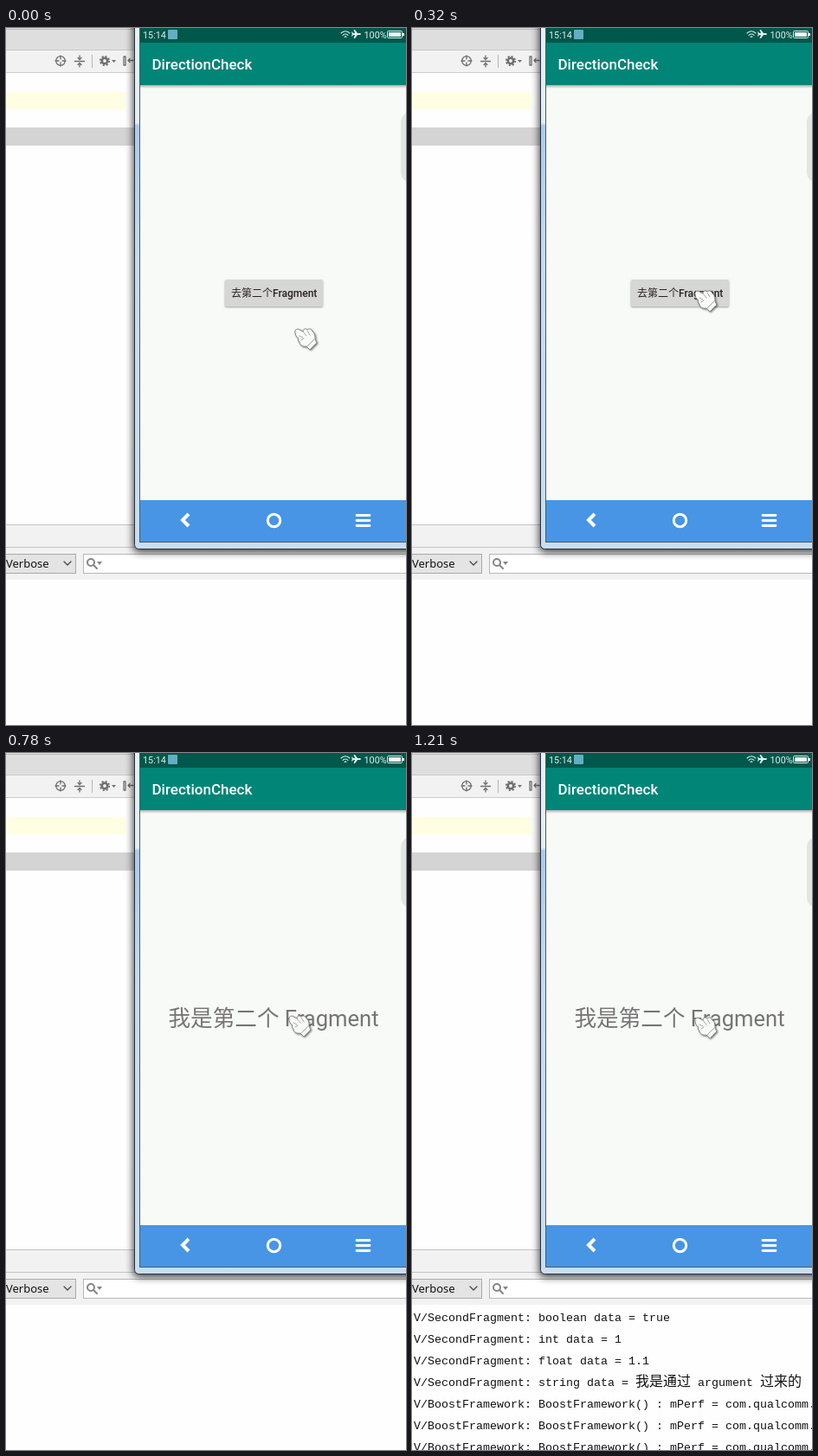
Recreate the animation shown at these times as an HTML page. Size 462x806 px, loop 1.57 s.

```html
<!DOCTYPE html>
<html lang="zh">
<head>
<meta charset="utf-8">
<title>Fragment navigation</title>
<style>
  html, body { margin: 0; width: 100%; height: 100%; overflow: hidden; background: #fefefe; }
  svg { display: block; width: 100%; height: 100%; }
  text { white-space: pre; }
  .ui { font-family: Roboto, "Noto Sans CJK SC", "Noto Sans CJK", sans-serif; }
  .log { font: 13.333px "Liberation Mono", "Noto Sans CJK SC", "Noto Sans CJK", monospace; fill: #111; }
  .log tspan { font-size: 16px; }
  .line { fill: none; stroke-linecap: round; stroke-linejoin: round; }
</style>
</head>
<body>
<svg viewBox="0 0 462 806">
  <defs>
    <linearGradient id="frame" x2="0" y2="1">
      <stop offset="0" stop-color="#e9f1f8"/>
      <stop offset=".195" stop-color="#e2edf7"/>
      <stop offset=".2" stop-color="#a9cbed"/>
      <stop offset=".45" stop-color="#c4dcf3"/>
      <stop offset="1" stop-color="#c9def2"/>
    </linearGradient>
    <linearGradient id="barShadow" x2="0" y2="1">
      <stop stop-color="#000" stop-opacity=".3"/>
      <stop offset="1" stop-color="#000" stop-opacity="0"/>
    </linearGradient>
    <filter id="blur" x="-10%" y="-10%" width="120%" height="120%"><feGaussianBlur stdDeviation="5"/></filter>
  </defs>

  <!-- editor panels -->
  <rect width="462" height="806" fill="#fefefe"/>
  <rect width="462" height="25" fill="#dedede"/>
  <path d="M0 1.5H150" stroke="#b9b9b9"/>
  <rect y="25" width="462" height="26" fill="#f2f2f2"/>
  <path d="M0 25.5H150M0 51.5H150" stroke="#cbcbcb"/>
  <rect y="74" width="138" height="20" fill="#fffee3"/>
  <rect y="115" width="150" height="21" fill="#d4d4d4"/>
  <rect y="574" width="462" height="64" fill="#f2f2f2"/>
  <path d="M0 574.5H462M0 600.5H462" stroke="#c4c4c4"/>

  <!-- editor toolbar icons -->
  <g class="line" stroke="#6e6e6e" stroke-width="1.3">
    <circle cx="63" cy="38" r="5.3"/>
    <path d="M63 32v4M63 40v4M57 38h4M65 38h4M79.500 38.500h11M85 32v4M85 45v-4M83 34.500l2 2 2-2M83 42.500l2-2 2 2"/>
    <circle cx="114" cy="38" r="3.2" stroke-width="2.6"/>
    <circle cx="114" cy="38" r="5.200" stroke-width="1.8" stroke-linecap="butt" stroke-dasharray="2.040 2.040"/>
    <path d="M136 33h2v10h-2zM147 37.500h-6M143 35.500l-2 2 2 2"/>
  </g>
  <path d="M122 37h5l-2.500 3z" fill="#6e6e6e"/>
  <path d="M99.500 31v15" stroke="#b5b5b5"/>

  <!-- log filter controls -->
  <rect x="-2.500" y="608.500" width="83" height="22" fill="#e4e4e4" stroke="#a9a9a9"/>
  <text y="624" font-family="Noto Sans, sans-serif" font-size="13" fill="#111">Verbose</text>
  <path class="line" d="M67 617l4 4 4-4" stroke="#444" stroke-width="1.2"/>
  <rect x="89.500" y="608.500" width="380" height="22" fill="#fff" stroke="#b7b7b7"/>
  <g class="line" stroke="#858585" stroke-width="2">
    <circle cx="98" cy="618" r="4"/>
    <path d="M101 621l4 4"/>
  </g>
  <path d="M105 617h6l-3 4z" fill="#858585"/>

  <g id="log" class="log"></g>

  <!-- phone window -->
  <rect x="147" y="-20" width="340" height="626" rx="6" opacity=".75" filter="url(#blur)"/>
  <rect x="148.500" y="-9.500" width="340" height="612" rx="5" fill="url(#frame)" stroke="#28323c"/>
  <rect x="154.500" y="-5" width="320" height="599.500" fill="#f8faf7" stroke="#4b5a68"/>
  <rect x="155" y="66" width="307" height="4" fill="url(#barShadow)"/>
  <rect x="155" y="17" width="307" height="49" fill="#008577"/>
  <rect x="155" width="307" height="17" fill="#00574b"/>
  <rect x="155" y="546" width="307" height="48" fill="#4795e4"/>

  <!-- status bar -->
  <g class="ui" font-size="10.800" fill="#e3efed">
    <text x="158" y="12">15:14</text>
    <text x="413.500" y="12">100%</text>
  </g>
  <rect x="187" y="2" width="11" height="11" rx="1" fill="#63aec3"/>
  <g class="line" stroke="#dfecea" stroke-width="1.1">
    <path d="M387 6q5-4.500 10 0M389 8.300q3-2.600 6 0M391 10.300q1-1 2 0"/>
  </g>
  <path d="M410 7q0-1-1.500-1H406l-3-4h-1.500l1.500 4h-2l-1-1.500h-1l.8 2.500-.8 2.500h1l1-1.500h2l-1.500 4h1.500l3-4h2.500q1.500 0 1.500-1z" fill="#e3efed"/>
  <rect x="440.500" y="3.500" width="17" height="8" rx="1" fill="none" stroke="#e3efed"/>
  <path d="M442 5h14v5h-14zM458 6h2v3h-2z" fill="#f4f8f7"/>

  <text class="ui" x="168.500" y="48" font-size="17" font-weight="500" fill="#fff">DirectionCheck</text>
  <rect x="456" y="97" width="30" height="82" rx="12" fill="#e3e5e3"/>

  <!-- navigation buttons -->
  <g class="line" stroke="#fff">
    <path d="M211 562l-7 7 7 7" stroke-width="4" stroke-linecap="butt" stroke-linejoin="miter"/>
    <circle cx="309.500" cy="569.500" r="7.200" stroke-width="3"/>
    <path d="M405 563.500h15M405 569.500h15M405 575.500h15" stroke-width="2.800"/>
  </g>

  <g id="firstPage" class="ui">
    <rect id="button" x="253" y="291" width="113" height="31" rx="1.500"/>
    <text x="260" y="310.700" font-size="12" font-weight="500" fill="#2a2222">去第二个Fragment</text>
  </g>
  <text id="secondPage" class="ui" x="187.500" y="315.500" font-size="25.600" fill="#757575">我是第二个 Fragment</text>

  <g id="hand">
    <g transform="translate(333 347)">
      <path id="glove" d="M1 5C0 2 4 0 6 2L10 4C10 1 13 0 15 2C17 0 20 1 21 4C24 6 24 10 24 13L26 17L18 25L14 21C9 22 6 19 6 16C4 15 4 13 5 12C2 10 1 7 1 5Z"
        fill="#fafafa" stroke="#858585" style="filter:drop-shadow(1px 1.500px 1px #0008)"/>
      <path class="line" d="M6 9l4 2M10 4l4 5M15 3l3 5M8 14l3-2M15 21l8-8" stroke="#a5a5a5"/>
    </g>
  </g>
</svg>
<script>
  const LOOP = 1570, STEP = 30;
  const PRESS = 530, RAISED = 710, PAGE_CHANGE = 780, LOG_SHOWN = 840;
  const $ = id => document.getElementById(id);

  // [start time, x, y]: each pose holds until the next
  const handPoses = [
    [0, 0, 0], [150, -1, -5], [180, -3, -16], [210, -5, -27], [240, -6, -36],
    [270, -7, -41], [320, -7, -44], [1150, -7, -43], [1180, -7, -42.500], [1210, -7, -42]
  ];

  const boost = "V/BoostFramework: BoostFramework() : mPerf = com.qualcomm.qti";
  const lines = [
    "V/SecondFragment: boolean data = true",
    "V/SecondFragment: int data = 1",
    "V/SecondFragment: float data = 1.1",
    "V/SecondFragment: string data = <tspan>我是通过</tspan> argument <tspan>过来的</tspan>",
    boost, boost, boost
  ];
  $("log").innerHTML = lines.map((line, i) => `<text x="2" y="${657 + 25 * i}">${line}</text>`).join("");

  const show = (id, visible) => $(id).style.display = visible ? "" : "none";

  function draw(now) {
    const t = now % LOOP;
    const [, x, y] = handPoses.findLast(([start]) => start <= t);
    $("hand").setAttribute("transform", `translate(${x} ${y})`);

    const stepped = Math.floor((t - PRESS) / STEP) * STEP;
    const lift = Math.min(1, Math.max(0, stepped / (RAISED - STEP - PRESS)));
    const shade = 214 - 4 * lift;
    $("button").style.fill = `rgb(${shade},${shade},${shade - 1})`;
    $("button").style.filter =
      `drop-shadow(0 ${1 + lift}px ${1 + 1.5 * lift}px rgba(0,0,0,${0.35 + 0.1 * lift}))`;

    show("firstPage", t < PAGE_CHANGE);
    show("secondPage", t >= PAGE_CHANGE);
    show("log", t >= LOG_SHOWN);
  }

  const begin = performance.now();
  function tick() {
    draw(performance.now() - begin);
    requestAnimationFrame(tick);
  }
  tick();
</script>
</body>
</html>
```
